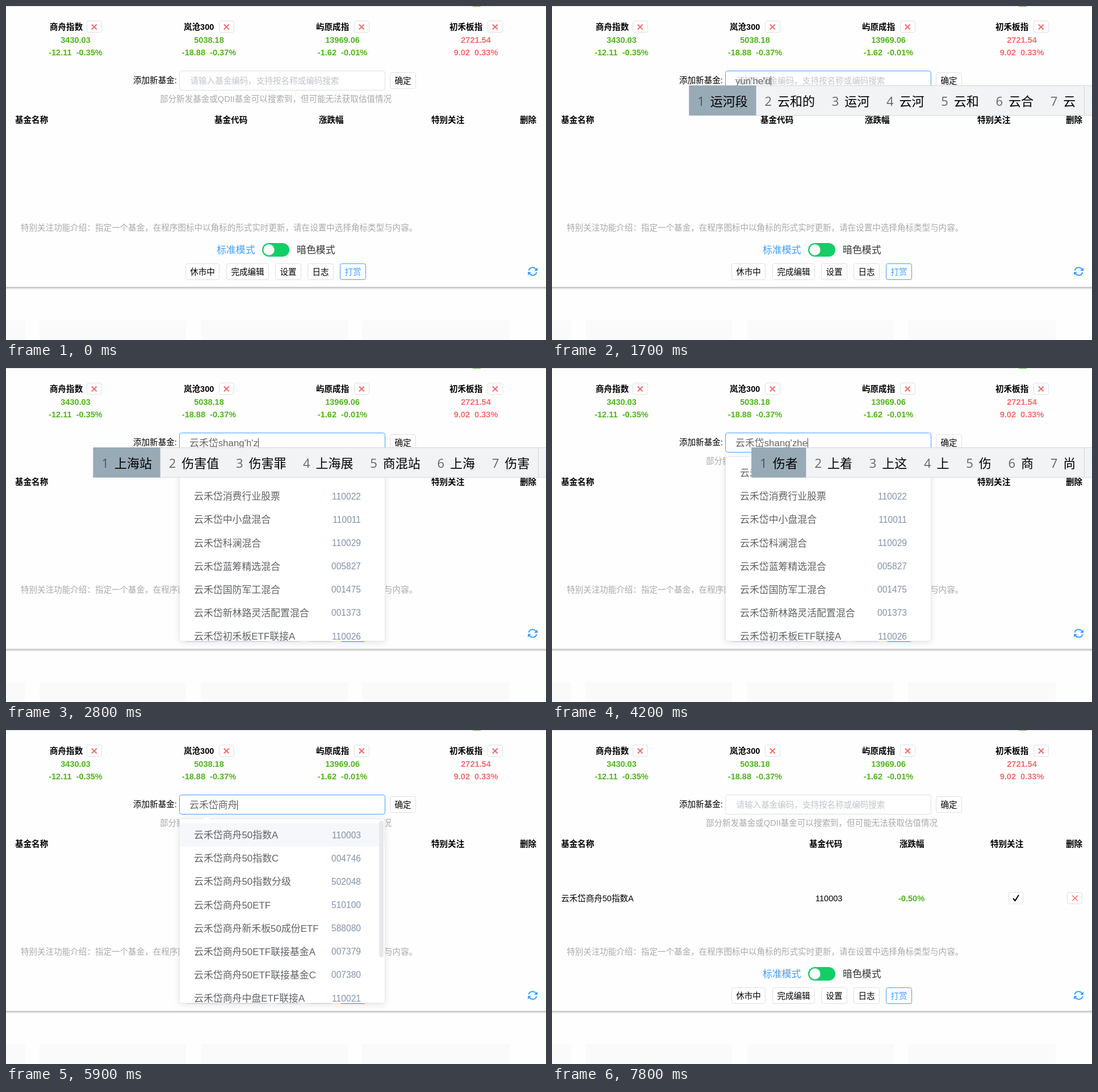
An HTML page that plays this animation: 951x589 px, repeating every 8 s.

```html
<!DOCTYPE html>
<html lang="zh-CN">
<head>
<meta charset="utf-8">
<style>
html, body { margin: 0; width: 100%; height: 100%; overflow: hidden; background: #fefefe; }
svg { display: block; width: 951px; height: 589px; }
text { font-family: "Liberation Sans", "Noto Sans CJK SC", "Noto Sans CJK", sans-serif; white-space: pre; }
.ime { font-family: "Open Sans", "Noto Sans CJK SC", "Noto Sans CJK", sans-serif; }
</style>
</head>
<body>
<svg id="stage" viewBox="0 0 951 589"></svg>
<script>
const LOOP = 8000, SMALL = 14.56, LARGE = 16.9;
const BLUE = "#409eff", GREEN = "#4eb61b", RED = "#f56c6c", LINE = "#dcdfe6", HINT = "#a9a9a9";
const BRAND = "云禾岱", INDEX = BRAND + "商舟", CHOSEN = INDEX + "50指数A";

const ctx = document.createElement("canvas").getContext("2d");
ctx.font = `${LARGE}px "Liberation Sans", "Noto Sans CJK SC", "Noto Sans CJK", sans-serif`;
const widthOf = s => ctx.measureText(s).width;

// y is the vertical middle of the glyphs
const text = (x, y, s, { size = SMALL, fill = "#000", bold, anchor = "start", cls = "" } = {}) =>
  `<text class="${cls}" x="${x}" y="${y + size * .37}" font-size="${size}" fill="${fill}" text-anchor="${anchor}"${bold ? ' font-weight="700"' : ""}>${s}</text>`;
const rect = (x, y, w, h, fill, r = 0, stroke = "none") =>
  `<rect x="${x}" y="${y}" width="${w}" height="${h}" rx="${r}" fill="${fill}" stroke="${stroke}"/>`;
const path = (d, stroke, width = 1.5, fill = "none") =>
  `<path d="${d}" fill="${fill}" stroke="${stroke}" stroke-width="${width}"/>`;
const box = (x, y, w, h, stroke = LINE) => rect(x + .5, y + .5, w - 1, h - 1, "#fff", 3, stroke);
const cross = (x, y, r, color, width) => path(`M${x - r} ${y - r}l${2 * r} ${2 * r}m0 ${-2 * r}l${-2 * r} ${2 * r}`, color, width);
const button = (x, y, w, label, color) =>
  box(x, y, w, 29, color || LINE) + text(x + w / 2, y + 14.2, label, { anchor: "middle", fill: color });

const indices = [
  ["商舟指数", 77, 142, "3430.03", "-12.11", "-0.35%"],
  ["岚沧300", 313, 375, "5038.18", "-18.88", "-0.37%"],
  ["屿原成指", 546, 613, "13969.06", "-1.62", "-0.01%"],
  ["初禾板指", 781, 848, "2721.54", "9.02", "0.33%"]
];

const brandFunds = [
  ["稳健成长混合", "110010"], ["消费行业股票", "110022"], ["中小盘混合", "110011"],
  ["科澜混合", "110029"], ["蓝筹精选混合", "005827"], ["国防军工混合", "001475"],
  ["新林路灵活配置混合", "001373"], ["初禾板ETF联接A", "110026"]
].map(([name, code]) => [BRAND + name, code]);
const indexFunds = [
  ["50指数A", "110003"], ["50指数C", "004746"], ["50指数分级", "502048"],
  ["50ETF", "510100"], ["新禾板50成份ETF", "588080"], ["50ETF联接基金A", "007379"],
  ["50ETF联接基金C", "007380"], ["中盘ETF联接A", "110021"]
].map(([name, code]) => [INDEX + name, code]);

// time, committed text, pinyin, candidates
const typing = [
  [0, "", ""],
  [1200, "", "y", "有 一 要 也 与 用 以"],
  [1300, "", "yu", "与 于 语 雨 鱼 玉 预"],
  [1400, "", "yun", "云 运 允 孕 韵 匀 晕"],
  [1500, "", "yun'h", "云海 运河 韵和 云 运 孕 允"],
  [1600, "", "yun'he", "云和 运河 云盒 云河 韵和 云 运"],
  [1700, "", "yun'he'd", "运河段 云和的 运河 云河 云和 云合 云"],
  [1800, "", "yun'he'da", "运河大 云和大 云河大 运河 云河 云和 云合"],
  [1900, "", "yun'he'dai", BRAND + " 运河 云河 云和 云合 云盒 韵和"],
  [2300, BRAND, ""],
  [2800, BRAND, "shang'h'z", "上海站 伤害值 伤害罪 上海展 商混站 上海 伤害"],
  [3300, BRAND, "shang'h", "上海 伤害 商会 商行 上好 上回 伤寒"],
  [3900, BRAND, "shang", "上 商 伤 尚 赏 裳 晌"],
  [4000, BRAND, "shang'z", "上涨 上周 上座 上 伤 商 尚"],
  [4100, BRAND, "shang'zh", "上周 上涨 商州 伤者 上着 上站 上桌"],
  [4200, BRAND, "shang'zhe", "伤者 上着 上这 上 伤 商 尚"],
  [4300, BRAND, "shang'zh", "上周 上涨 商州 伤者 上着 上站 上桌"],
  [4400, BRAND, "shang'zho", "上周 上肘 商州 商舟 上 伤 商"],
  [4500, BRAND, "shang'zhou", "商舟 上周 商州 商周 上轴 上肘 伤周"],
  [4900, INDEX, ""],
  [7600, "", ""]
];

function page() {
  let s = rect(0, 0, 951, 1, "#d9dbe3") + rect(822, 0, 14, 1, GREEN);
  indices.forEach(([name, x, bx, value, delta, pct], i) => {
    const style = { bold: true, anchor: "middle", fill: i < 3 ? GREEN : RED }, mid = 122.5 + 235 * i;
    s += text(x, 36.5, name, { bold: true }) + box(bx, 26, 27, 21) + cross(bx + 13.3, 36.8, 4.4, RED, 2.1);
    s += text(mid, 60, value, style) + text(mid, 81.5, `${delta}\u00a0\u00a0${pct}`, style);
  });
  s += text(224, 131, "添加新基金:") + button(676, 117, 46, "确定");
  s += text(271, 164, "部分新发基金或QDII基金可以搜索到，但可能无法获取估值情况", { fill: HINT });
  s += text(26, 390.5, "特别关注功能介绍：指定一个基金，在程序图标中以角标的形式实时更新，请在设置中选择角标类型与内容。", { fill: HINT });
  s += text(371, 430, "标准模式", { size: LARGE, fill: BLUE }) + text(512, 430, "暗色模式", { size: LARGE, fill: "#303133" });
  s += rect(451, 418, 48, 24, "#13ce66", 12) + `<circle cx="463" cy="430" r="9.7" fill="#fff"/>`;
  [[316, 60, "休市中"], [388, 75, "完成编辑"], [474, 46, "设置"], [531, 46, "日志"], [588, 46, "打赏", BLUE]]
    .forEach(([x, w, label, color]) => s += button(x, 454, w, label, color));
  s += path("M920.5 466.5a7 7 0 0 1 13-1.5M934.5 469.5a7 7 0 0 1-13 1.5", BLUE, 2.1);
  s += path("M936 461v6h-6zM919 475v-6h6z", "none", 0, BLUE);
  s += rect(0, 495.5, 951, 1.2, "#adadad") + rect(0, 496.7, 951, 1.3, "#d2d2d2") + rect(0, 498, 951, 2, "#f0f0f0");
  [[0, 34], [59, 258], [344, 258], [627, 260]].forEach(([x, w]) => s += rect(x, 554, w, 35, "#fafafa"));
  return s;
}

function table(added) {
  const xs = added ? [16, 453, 612, 772, 905] : [16, 367, 551, 749, 905];
  let s = ["基金名称", "基金代码", "涨跌幅", "特别关注", "删除"].map((h, i) => text(xs[i], 200.5, h, { bold: true })).join("");
  if (added) {
    s += text(16, 297, CHOSEN) + text(464, 296.5, "110003") + text(610, 296.5, "-0.50%", { bold: true, fill: GREEN });
    s += box(804, 286, 26, 21) + path("M812 297l3.5 4 6.5-10", "#000", 2);
    s += box(907, 286, 27, 21) + cross(921, 296.5, 4.8, RED, 1.5);
  }
  return s;
}

function inputField(t, committed, pinyin) {
  const border = t < 200 || t >= 7600 ? LINE : t < 500 ? "#c0c4cc" : t < 600 ? "#80b1e6" : BLUE;
  const tagged = t >= 6200 && t < 7600;
  const start = tagged ? 487.5 : 323, value = committed + pinyin;
  const caretOn = t >= 500 && t < 7600 && !(t >= 900 && t < 1200) && !(t >= 5400 && t < 5900) && !(t >= 6800 && t < 7200);
  let s = rect(305.5, 114.5, 362, 34, "#fff", 4, border);
  if (!committed) s += text(324.5, 131.5, "请输入基金编码，支持按名称或编码搜索", { fill: "#c0c4cc" });
  if (tagged) {
    s += rect(312.5, 119.5, 159, 25, "#f4f4f5", 4, "#e9e9eb") + text(320.5, 132, CHOSEN, { fill: "#909399" });
    s += `<circle cx="459" cy="132" r="7.5" fill="#c0c4cc"/>` + cross(459, 132, 2.7, "#fff", 1.2);
  }
  s += text(start, 132, value, { size: LARGE, fill: "#666" });
  if (caretOn) s += rect(Math.round(start + widthOf(value)), 123.5, 1, 17.5, "#444");
  return s;
}

function funds(list, t) {
  const hover = t < 5200 ? -1 : t >= 6500 && t < 6700 ? 1 : 0;
  const rows = list.map(([name, code], i) => {
    const y = 184.8 + 41.15 * i, bold = i === 0 && t >= 6200;
    return (i === hover ? rect(306, y - 20.6, 361, 41.2, "#f5f7fa") : "") +
      text(331, y, name, { size: LARGE, fill: bold ? BLUE : "#606266", bold }) +
      text(625, y, code, { size: 15.6, fill: "#8492a6", anchor: "end", bold }) +
      (bold ? path(`M631.5 ${y}l3.5 4 6.5-8`, BLUE, 1.6) : "");
  }).join("");
  const bar = t >= 5900 && t < 7000 ? rect(657, 160, 8, 241, "#e8e9ec", 4) : "";
  return `<g clip-path="url(#list)">${rows}</g>${bar}`;
}

const easeOut = u => 1 - (1 - Math.min(1, Math.max(0, u))) ** 5;

function popup(t) {
  const shown = t < 7600 ? easeOut((t - 2250) / 300) : 1 - easeOut((t - 7580) / 200);
  if (shown < .01) return "";
  const loading = t < 2600 || (t >= 4900 && t < 5200);
  const height = loading ? 44 : 325;
  return `<g opacity="${shown}" transform="translate(0 ${157 * (1 - shown)}) scale(1 ${shown})">` +
    `<g filter="url(#shadow)">${rect(305.5, 156.5, 362, height, "#fff", 4, "#e4e7ed")}</g>` +
    path("M347 157l7-6 7 6", "#ebeef5", 1, "#fff") +
    (loading ? text(486.5, 179, "加载中", { size: LARGE, fill: "#999", anchor: "middle" })
             : funds(t < 4900 ? brandFunds : indexFunds, t)) + "</g>";
}

function imeBar(committed, candidates) {
  if (!candidates) return "";
  const words = candidates.split(" "), cell = w => 52.3 + 21.97 * w.length;
  const total = words.reduce((sum, w) => sum + cell(w), 0);
  let x = Math.min(322 + widthOf(committed), 937 - total);
  let s = rect(x + .5, 140.5, 1100 - x, 52.5, "#f1f3f5", 0, "#d3d6d9");
  words.forEach((word, i) => {
    if (!i) s += rect(x, 140, cell(word), 53, "#98aab6");
    s += text(x + 15, 167.5, i + 1, { size: 22, fill: i ? "#666" : "#4d5459", cls: "ime" });
    s += text(x + 37.5, 167.5, word, { size: 22, cls: "ime" });
    x += cell(word);
  });
  s += rect(x, 141, 1, 52, "#d3d6d9") + rect(x + 79, 141, 1, 52, "#d3d6d9");
  s += path(`M${x + 21.5} 161l-7 7 7 7`, "#aaa") + path(`M${x + 58.5} 161l7 7-7 7`, "#222");
  const face = x + 108.5;
  s += path(`M${face - 9} 168a9 9 0 1 1 18 0a9 9 0 1 1-18 0M${face - 5} 170q5 5 10 0M${face - 4} 164v2m8-2v2`, "#222");
  return s;
}

const defs = `<defs><clipPath id="list"><rect x="306" y="157" width="361" height="324"/></clipPath>
<filter id="shadow" x="-10%" y="-30%" width="120%" height="170%"><feDropShadow dx="0" dy="2" stdDeviation="6" flood-opacity=".1"/></filter></defs>`;
const fixed = page(), stage = document.getElementById("stage");
let last = -1;

function draw() {
  const t = Math.floor(performance.now() % LOOP / 100) * 100; // ten steps a second
  if (t !== last) {
    last = t;
    const [, committed, pinyin, candidates] = typing.filter(step => step[0] <= t).pop();
    stage.innerHTML = defs + fixed + table(t >= 7600) + inputField(t, committed, pinyin) + popup(t) + imeBar(committed, candidates);
  }
  requestAnimationFrame(draw);
}
draw();
</script>
</body>
</html>
```
